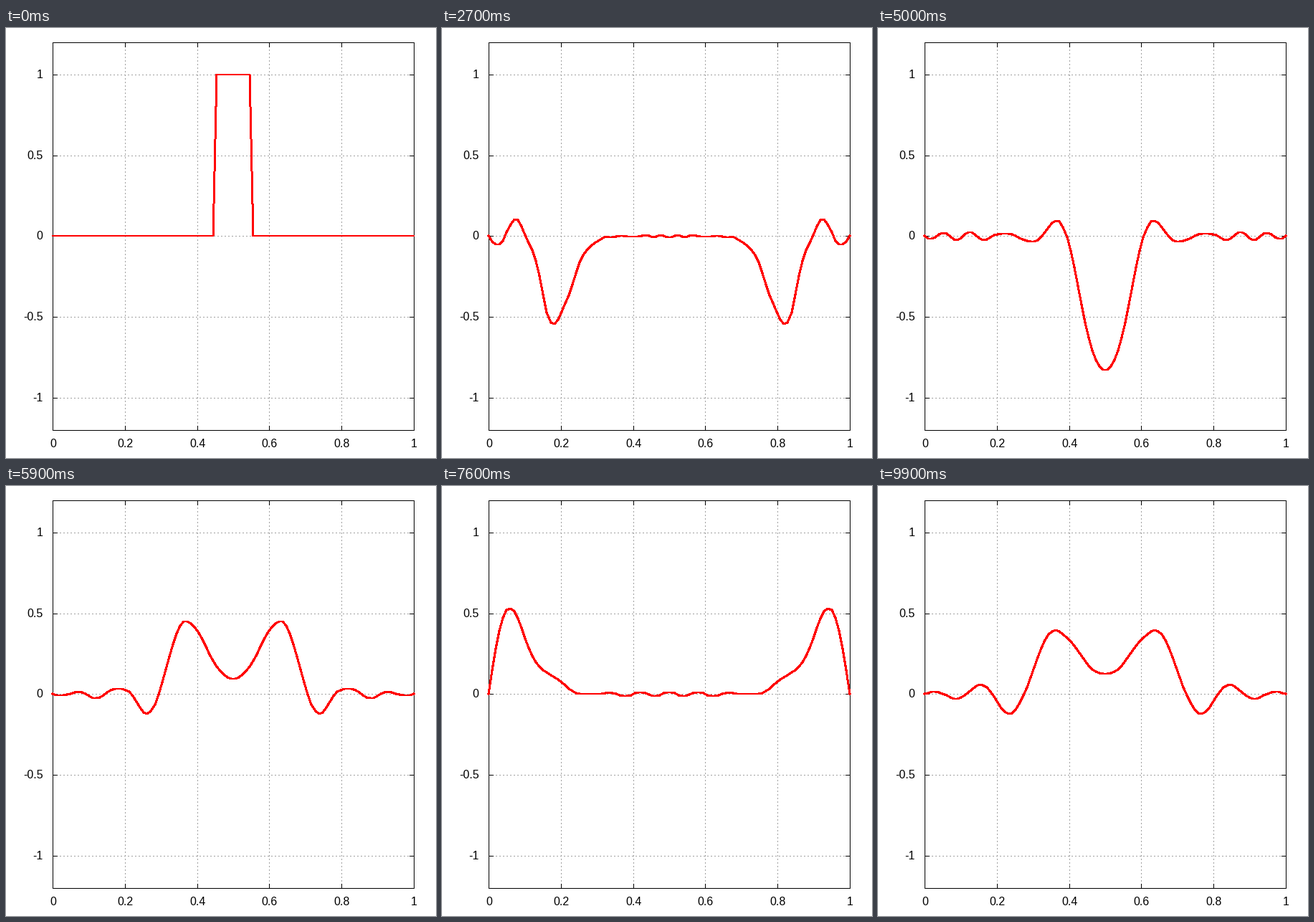
Write a matplotlib script that moves like this. It is 600 px wide and 600 px high and loops after 10000 ms.

```python
import numpy as np
import matplotlib.pyplot as plt
from matplotlib.animation import FuncAnimation

SIZE, DPI = 600, 100
PX = 72 / DPI                      # one pixel in points
LEFT, RIGHT, TOP, BOTTOM = 65, 569, 20, 561
CELLS = 99                         # grid cells on the string
DT = 1e-4                          # implicit Euler time step
STEPS = 1000                       # time steps per frame
FRAMES = 100


def to_x(x):
    return np.floor(LEFT + x * (RIGHT - LEFT) + 0.5)


def to_y(y):
    exact = BOTTOM - (y + 1.2) * (BOTTOM - TOP) / 2.4
    return np.ceil(exact - 0.5 - 1e-6)


# Wave equation with fixed ends, solved in its discrete sine modes.
nodes = np.arange(CELLS + 1)
modes = np.arange(1, CELLS)
shapes = np.sin(np.pi * np.outer(modes, nodes) / CELLS)
pulse = ((nodes >= 45) & (nodes <= 54)).astype(float)
weights = 2 / CELLS * shapes @ pulse
omega = 2 * CELLS * np.sin(np.pi * modes / (2 * CELLS))
gain = 1 / (1 - 1j * omega * DT)


def height(frame):
    return (weights * (gain ** (frame * STEPS)).real) @ shapes


fig = plt.figure(figsize=(SIZE / DPI, SIZE / DPI), dpi=DPI, facecolor="white")
ax = fig.add_axes([0, 0, 1, 1])
ax.set_xlim(0, SIZE)
ax.set_ylim(SIZE, 0)
ax.axis("off")


def line(xs, ys, color="black", width=1, **style):
    return ax.plot(xs, ys, color=color, lw=width * PX, antialiased=False,
                   snap=False, **style)[0]


def rule(x0, y0, x1, y1, **style):
    """One-pixel line through pixel centres."""
    line([x0 + 0.5, x1 + 0.5], [y0 + 0.5, y1 + 0.5], **style)


def label(x, y, value, align):
    ax.text(x, y, f"{value:g}", ha=align, va="baseline", color="black",
            family="Liberation Sans", fontsize=16 * PX)


GRID = dict(color="#a0a0a0", linestyle=(0, (2, 3)), dash_capstyle="butt")
TICK = 6

for v in (-1, -0.5, 0, 0.5, 1):
    y = to_y(v)
    rule(LEFT, y, RIGHT, y, **GRID)
    rule(LEFT, y, LEFT + TICK, y)
    rule(RIGHT - TICK, y, RIGHT, y)
    label(51.5, y + 5, v, "right")

for v in (0, 0.2, 0.4, 0.6, 0.8, 1):
    x = to_x(v)
    if 0 < v < 1:
        rule(x, BOTTOM, x, TOP, **GRID)
        rule(x, BOTTOM, x, BOTTOM - TICK)
        rule(x, TOP, x, TOP + TICK)
    label(x + 0.5, 585, v, "center")

for y in (TOP, BOTTOM):
    rule(LEFT, y, RIGHT, y, solid_capstyle="projecting")
for x in (LEFT, RIGHT):
    rule(x, TOP, x, BOTTOM, solid_capstyle="projecting")

curve_x = to_x(nodes / CELLS)
curve = line(curve_x, to_y(pulse), color="#ff0000", width=2, zorder=5,
             solid_capstyle="projecting", solid_joinstyle="round")


def update(frame):
    curve.set_data(curve_x, to_y(height(frame)))
    return (curve,)


anim = FuncAnimation(fig, update, frames=FRAMES, interval=100, repeat=True,
                     repeat_delay=0, blit=False)
plt.show()
```
